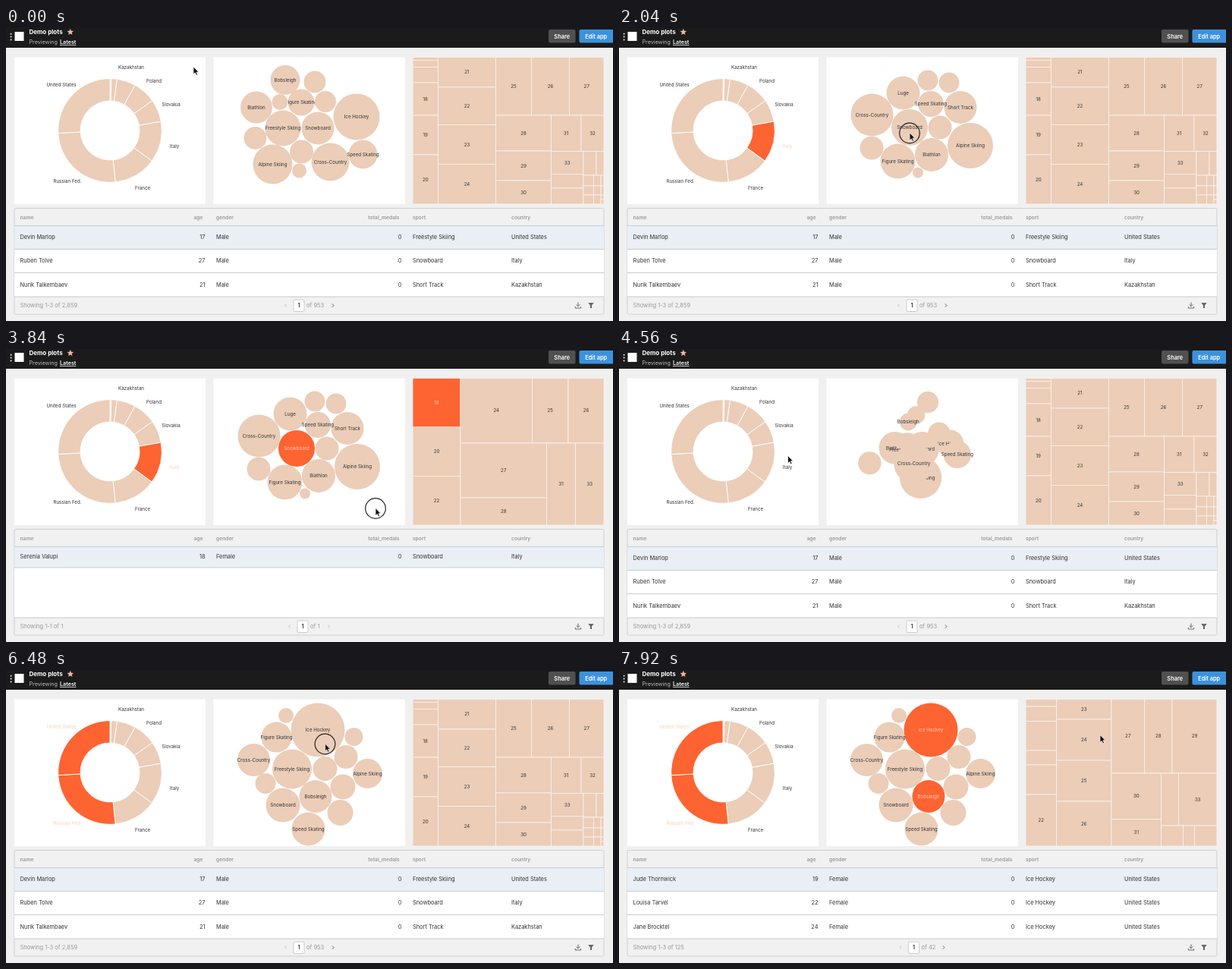
These frames come from a looping animation (800 by 386 pixels, 8 s). An HTML page:

```html
<!DOCTYPE html>
<html lang="en">
<head>
<meta charset="utf-8">
<title>Chart dashboard</title>
<style>
  html, body { margin: 0; width: 100%; height: 100%; overflow: hidden; background: #f0f0f0; }
  svg { display: block; width: 100vw; height: 100vh; font-family: Inter, "Open Sans", sans-serif; }
</style>
</head>
<body>
<svg id="stage" viewBox="0 0 800 386" preserveAspectRatio="none">
  <g id="chrome"></g>
  <g id="charts"></g>
  <g id="table"></g>
  <g id="pointer"></g>
</svg>
<script>
const LOOP = 8000, TICK = 120, PACK_TIME = 440;
const PEACH = '#ebcdb8', ORANGE = '#fe6332', PALE = '#f5d2bd', INK = '#333', GREY = '#999';

const rect = (x0, y0, x1, y1, fill, extra = '') =>
  `<rect x="${x0}" y="${y0}" width="${x1 - x0}" height="${y1 - y0}" fill="${fill}" ${extra}/>`;
const circle = (x, y, r, fill, extra = '') => `<circle cx="${x}" cy="${y}" r="${r}" fill="${fill}" ${extra}/>`;
const path = (d, fill, extra = '') => `<path d="${d}" fill="${fill}" ${extra}/>`;
const text = (x, y, str, { size = 6.2, anchor = 'start', fill = INK, weight = 400, extra = '' } = {}) =>
  `<text x="${x}" y="${y + size * .36}" font-size="${size}" text-anchor="${anchor}" fill="${fill}" font-weight="${weight}" ${extra}>${str}</text>`;
const label = (x, y, str, fill = INK) => text(x, y, str, { anchor: 'middle', fill });
const ease = p => p < .5 ? 2 * p * p : 1 - 2 * (1 - p) ** 2;
const mix = (a, b, p) => a + (b - a) * p;
const clamp = p => Math.min(1, Math.max(0, p));

// Donut: name, clockwise end angle in degrees, label position
const slices = [
  ['', 1.5], ['', 8], ['Kazakhstan', 29, 165, 52], ['Poland', 55, 195, 69.5], ['Slovakia', 80, 217.5, 100.5],
  ['Italy', 126, 222, 155.5], ['France', 174, 180, 211], ['Russian Fed.', 267, 81, 202], ['United States', 360, 73, 75]
];

// Packed bubbles: x, y, radius, sport
const packs = {
  all: [
    [389, 98, 17.5, 'Figure Skating'], [407, 71, 14.5], [361, 97.5, 10.5], [421, 97, 14], [328.5, 145, 15],
    [389.5, 163, 15.5], [386.5, 188, 9.5], [368, 68.5, 19.5, 'Bobsleigh'], [330, 104.5, 21, 'Biathlon'],
    [462, 117, 30.5, 'Ice Hockey'], [365, 132, 23.5, 'Freestyle Skiing'], [411, 132, 21.5, 'Snowboard'],
    [351.5, 179.5, 26, 'Alpine Skiing'], [427.5, 176.5, 25, 'Cross-Country'], [470.5, 166.5, 19, 'Speed Skating']
  ],
  italy: [
    [407, 69, 13.5], [435, 72, 13.5], [423, 131, 15.5], [333, 158, 15.5], [394, 190.5, 7],
    [374.5, 85.5, 22, 'Luge'], [450, 104.5, 21.5, 'Short Track'], [333.5, 114.5, 28, 'Cross-Country'],
    [383, 131, 24, 'Snowboard'], [367.5, 175.5, 23, 'Figure Skating'], [412, 167, 22, 'Biathlon'],
    [463, 155, 30, 'Alpine Skiing'], [411, 100, 17, 'Speed Skating']
  ],
  us: [
    [364, 64.5, 10], [452, 93.5, 11.5], [413.5, 134, 16.5], [441.5, 118, 14.5], [336.5, 153, 13.5],
    [437.5, 158, 16.5], [432, 191, 16.5], [406, 83, 35, 'Ice Hockey'], [351, 92.5, 20, 'Figure Skating'],
    [323, 121.5, 19.5, 'Cross-Country'], [372, 134, 25.5, 'Freestyle Skiing'], [473, 139.5, 23, 'Alpine Skiing'],
    [402.5, 169, 20, 'Bobsleigh'], [359.5, 184, 24.5, 'Snowboard'], [398, 210.5, 21.5, 'Speed Skating']
  ],
  usRussia: [
    [369, 60, 10], [458.5, 88, 12], [420.5, 130, 16], [448, 114.5, 15.5], [342, 149.5, 13.5],
    [444, 154, 16.5], [440.5, 188, 17], [411, 79, 35.5, 'Ice Hockey'], [356.5, 88.5, 20, 'Figure Skating'],
    [326.5, 118.5, 21.5, 'Cross-Country'], [377, 130.5, 26, 'Freestyle Skiing'], [476.5, 136.5, 19.5, 'Alpine Skiing'],
    [408, 166.5, 21.5, 'Bobsleigh'], [365, 178, 22.5, 'Snowboard'], [398.5, 209.5, 22, 'Speed Skating']
  ]
};

// Treemap: columns of cells stacked down, rows of cells side by side
const pairs = edges => edges.slice(1).map((e, i) => [edges[i], e]);
const col = (x0, x1, ys, names = []) => pairs(ys).map(([a, b], i) => [x0, a, x1, b, names[i] || '']);
const row = (y0, y1, xs, names = []) => pairs(xs).map(([a, b], i) => [a, y0, b, y1, names[i] || '']);
const L = 536, R = 788, T = 38.5, B = 232;
const trees = {
  all: [
    col(L, 569.5, [T, 42.5, 51.5, 72, 115, 167, B], ['', '', '', 18, 19, 20]),
    col(569.5, 645.5, [T, 78, 127.5, 179.5, B], [21, 22, 23, 24]),
    row(T, 115, [645.5, 692.5, 742.5, R], [25, 26, 27]),
    col(645.5, 718.5, [115, 162, 201, B], [28, 29, 30]),
    row(115, 162.5, [718.5, 758, R], [31, 32]),
    col(718.5, 761, [162.5, 192.5, 211, B], [33]),
    row(162.5, 194, [761, 778, R]),
    col(761, 774.5, [194, 208, 220, B]), col(774.5, 784, [194, 208, 220, B]), col(784, R, [194, 208, 220, 226, B])
  ],
  snowboard: [
    col(L, 599, [T, 103, 167.5, B], [18, 20, 22]),
    row(T, 124, [599, 693.5, 741, R], [24, 25, 26]),
    col(599, 712.5, [124, 196, B], [27, 28]),
    row(124, B, [712.5, 750.5, R], [31, 33])
  ],
  hockey: [
    col(L, 572, [T, 53, 82, 142.5, 172.5, B], ['', '', 19, '', 21]),
    col(572, 651.5, [T, 85, 111, 172, B], [22, 23, 24, 25]),
    row(T, 119.5, [651.5, 703.5, 755.5, R], [26, 27, 28]),
    col(651.5, 712.5, [119.5, 215, B], [29]),
    row(119.5, 169, [712.5, 756, R], [31]),
    row(169, B, [712.5, 763], [33]), col(763, R, [169, 211, B])
  ],
  hockeyBob: [
    col(L, 576.5, [T, 48, 67.5, 106, 125, 164, B], ['', '', '', '', '', 22]),
    col(576.5, 649, [T, 65, 119, 173, B], [23, 24, 25, 26]),
    row(T, 136, [649, 692.5, 729, R], [27, 28, 29]),
    col(649, 714.5, [136, 196.5, B], [30, 31]),
    row(136, 205, [714.5, 737.5, R], ['', 33]),
    row(205, B, [714.5, 743.5, 758.5, R])
  ]
};

const hockeyRows = [
  ['Jude Thornwick', 19, 'Female', 'Ice Hockey', 'United States'],
  ['Louisa Tarvel', 22, 'Female', 'Ice Hockey', 'United States'],
  ['Jane Brocktel', 24, 'Female', 'Ice Hockey', 'United States']
];
const ruben = ['Ruben Tolve', 27, 'Male', 'Snowboard', 'Italy'];
const tables = {
  all: { total: '2,859', pages: 953, box: 386, rows: [
    ['Devin Marlop', 17, 'Male', 'Freestyle Skiing', 'United States'], ruben,
    ['Nurik Talkembaev', 21, 'Male', 'Short Track', 'Kazakhstan']] },
  snowboard: { total: 12, pages: 4, box: 391, rows: [
    ruben, ['Leonhardt Wupf', 25, 'Male', 'Snowboard', 'Italy'],
    ['Lavinia Torrabeni', 28, 'Female', 'Snowboard', 'Italy']] },
  single: { total: 1, pages: 1, box: 391, rows: [['Serenia Valupi', 18, 'Female', 'Snowboard', 'Italy']] },
  hockey: { total: 92, pages: 31, box: 388.5, rows: hockeyRows },
  hockeyBob: { total: 125, pages: 42, box: 388.5, rows: hockeyRows }
};

const start = { faded: [], countries: [], pack: 'all', sports: [], tree: 'all', ages: [], table: 'all' };
const events = [
  [0, start],
  [1200, { faded: ['Italy'] }],
  [1320, { countries: ['Italy'] }],
  [1560, { pack: 'italy' }],
  [2160, { sports: ['Snowboard'] }],
  [2280, { tree: 'snowboard', table: 'snowboard' }],
  [3120, { ages: [18] }],
  [3240, { table: 'single' }],
  [4320, start],
  [4920, { faded: ['United States'] }],
  [5040, { countries: ['United States'] }],
  [5160, { pack: 'us' }],
  [5760, { faded: ['United States', 'Russian Fed.'] }],
  [5880, { countries: ['United States', 'Russian Fed.'] }],
  [6000, { pack: 'usRussia' }],
  [6600, { sports: ['Ice Hockey'] }],
  [6720, { tree: 'hockey', table: 'hockey' }],
  [7440, { sports: ['Ice Hockey', 'Bobsleigh'] }],
  [7680, { tree: 'hockeyBob', table: 'hockeyBob' }]
];
const moves = [
  [0, 247, 51], [240, 247, 51], [1080, 189.5, 142.5], [1440, 189.5, 142.5], [1920, 383, 138], [2280, 383, 138],
  [2760, 629, 140], [3000, 568, 76], [3360, 568, 76], [3720, 487, 209.5], [4200, 487, 209.5],
  [4800, 98, 108], [5280, 98, 108], [5640, 98.5, 175.5], [5880, 98.5, 177], [6480, 420.5, 97],
  [6960, 420.5, 97], [7200, 409, 172], [7440, 409, 172], [7920, 634, 85.5]
];
const clicks = [2040, 3000, 3840, 4920, 5760, 6480, 7320];

function stateAt(t) {
  let state = { from: 'all', since: -LOOP };
  for (const [at, change] of events) {
    if (at > t) break;
    if (state.pack && change.pack && change.pack !== state.pack) {
      state.from = state.pack;
      state.since = at;
    }
    state = { ...state, ...change };
  }
  return state;
}

function donut(s) {
  const cx = 137, cy = 135, outer = 68.3, inner = 39;
  const pt = (deg, r) => {
    const a = deg * Math.PI / 180;
    return `${(cx + r * Math.sin(a)).toFixed(2)} ${(cy - r * Math.cos(a)).toFixed(2)}`;
  };
  let from = 0, out = '';
  for (const [name, to] of slices) {
    const fill = name && s.countries.includes(name) ? ORANGE : PEACH;
    out += path(`M${pt(from, outer)}A${outer} ${outer} 0 0 1 ${pt(to, outer)}L${pt(to, inner)}A${inner} ${inner} 0 0 0 ${pt(from, inner)}Z`,
      fill, 'stroke="#fff" stroke-width=".9"');
    from = to;
  }
  for (const [name, , x, y] of slices)
    if (name) out += label(x, y, name, s.faded.includes(name) ? PALE : INK);
  return out;
}

function keyed(pack) {
  let blanks = 0;
  return new Map(pack.map(b => [b[3] || `blank${blanks++}`, b]));
}

function bubbles(s, t) {
  const p = ease(clamp((t - s.since) / PACK_TIME));
  const before = keyed(packs[s.from]);
  return [...keyed(packs[s.pack])].map(([key, to]) => {
    const from = before.get(key) || [400, 135, 0];
    const [x, y, r] = [0, 1, 2].map(i => mix(from[i], to[i], p));
    const on = s.sports.includes(key);
    return circle(x, y, r, on ? ORANGE : PEACH) + (to[3] ? label(x, y, to[3], on ? '#f8cfb9' : INK) : '');
  }).join('');
}

function treemap(s) {
  return trees[s.tree].flat().map(([x0, y0, x1, y1, name]) => {
    const on = s.ages.includes(name);
    return rect(x0, y0, x1, y1, on ? ORANGE : PEACH, 'stroke="#fbf3ed" stroke-width=".8"') +
      label((x0 + x1) / 2, (y0 + y1) / 2, name, on ? '#f8cfb9' : INK);
  }).join('');
}

function table(s) {
  const { total, pages, box, rows } = tables[s.table];
  const line = (y, color = '#cacaca') => rect(11, y - .5, 788, y + .5, color);
  const single = rows.length === 1;
  const firstEnd = single ? 288 : 291.5;
  let out = rect(11, 237.5, 788, 377, '#f1f1f1', 'rx="1.5" stroke="#cbd0d3" stroke-width="1"') +
    rect(11, 260, 788, 354, '#fff') + rect(11, 260, 788, firstEnd, '#e9eff4') +
    line(260.5, '#c5ced4') + line(firstEnd, '#c5ced4') + (single ? '' : line(322.5)) + line(354);
  const head = { size: 6.7, weight: 600, fill: GREY };
  const headEnd = { ...head, anchor: 'end' };
  out += text(18.5, 249.5, 'name', head) + text(259.5, 249.5, 'age', headEnd) + text(277, 249.5, 'gender', head) +
    text(518.5, 249.5, 'total_medals', headEnd) + text(536, 249.5, 'sport', head) + text(666, 249.5, 'country', head);
  const cell = { size: 7.4 }, num = { size: 7.4, anchor: 'end' };
  rows.forEach(([name, age, gender, sport, country], i) => {
    const y = single ? 273.5 : 275.3 + i * 31.5;
    out += text(18.5, y, name, cell) + text(262.5, y, age, num) + text(277, y, gender, cell) +
      text(521.5, y, 0, num) + text(536, y, sport, cell) + text(666, y, country, cell);
  });
  const foot = { size: 7.5, fill: GREY };
  const chevron = (x, dir, color) =>
    path(`M${x - dir} 363.4l${2 * dir} 2.1l${-2 * dir} 2.1`, 'none', `stroke="${color}" stroke-width="1"`);
  return out + text(18.5, 365.6, `Showing 1-${rows.length} of ${total}`, foot) +
    chevron(box - 17.3, -1, '#c4c4c4') + chevron(pages > 99 ? 431 : box > 390 ? 425.5 : 428, 1, single ? '#c4c4c4' : '#666') +
    rect(box - 7, 358, box + 7, 373.5, '#fff', 'rx="1.5" stroke="#ccc" stroke-width="1"') +
    text(box, 365.6, 1, { size: 7.4, anchor: 'middle', weight: 600 }) + text(box + 10, 365.6, `of ${pages}`, foot) +
    path('M754 361.5v5M751.7 364.4l2.3 2.3l2.3-2.3M750.3 367v2h7.4v-2', 'none', 'stroke="#666" stroke-width="1"') +
    path('M767.3 362h7.4l-2.7 3.5v3.5h-2v-3.5z', '#666');
}

function pointer(t) {
  let i = moves.findIndex(m => m[0] > t);
  if (i < 0) i = moves.length - 1;
  const [t0, x0, y0] = moves[i - 1], [t1, x1, y1] = moves[i];
  const p = ease(clamp((t - t0) / (t1 - t0)));
  const x = mix(x0, x1, p), y = mix(y0, y1, p);
  const ring = clicks.some(c => t >= c && t < c + 2 * TICK);
  return (ring ? circle(x, y + .5, 13.3, 'none', 'stroke="#222" stroke-width="1.2"') : '') +
    path(`M${x} ${y}v10l2.3-2.1l1.5 3.4l1.7-.7l-1.5-3.4h3z`, '#111', 'stroke="#fff" stroke-width=".7"');
}

function chrome() {
  const star = Array.from({ length: 10 }, (_, i) => {
    const r = i % 2 ? 2 : 4.6, a = i * Math.PI / 5;
    return `${84.8 + r * Math.sin(a)} ${5.4 - r * Math.cos(a)}`;
  }).join('L');
  const button = { size: 7.4, weight: 600, fill: '#fff', anchor: 'middle' };
  return rect(0, 0, 800, 386, '#f0f0f0') + rect(0, 0, 800, 26, '#1b1b1b') +
    [7.8, 11.6, 15.4].map(y => circle(6.6, y, 1, '#eee')).join('') + rect(11.5, 5, 23.5, 17, '#fff') +
    text(30.5, 5.3, 'Demo plots', { size: 8, weight: 700, fill: '#fff' }) + path(`M${star}Z`, '#f3b59b') +
    text(30.5, 18.5, 'Previewing', { size: 7.2, fill: '#bbb' }) +
    text(71, 18.5, 'Latest', { size: 7.2, weight: 600, fill: '#fff', extra: 'text-decoration="underline"' }) +
    rect(715, 2, 750.5, 19.5, '#505050', 'rx="2"') + text(732.7, 11.2, 'Share', button) +
    rect(755.5, 2, 802, 19.5, '#3c92dc', 'rx="2"') + text(777.7, 11.2, 'Edit app', button) +
    rect(11, T, 263, B, '#fff') + rect(273.5, T, 526, B, '#fff');
}

const layer = id => document.getElementById(id);
layer('chrome').innerHTML = chrome();

let shown = -1;
const origin = performance.now();
function frame() {
  const t = Math.floor((performance.now() - origin) % LOOP / TICK) * TICK;
  if (t !== shown) {
    shown = t;
    const s = stateAt(t);
    layer('charts').innerHTML = donut(s) + bubbles(s, t) + treemap(s);
    layer('table').innerHTML = table(s);
    layer('pointer').innerHTML = pointer(t);
  }
  requestAnimationFrame(frame);
}
frame();
</script>
</body>
</html>
```
